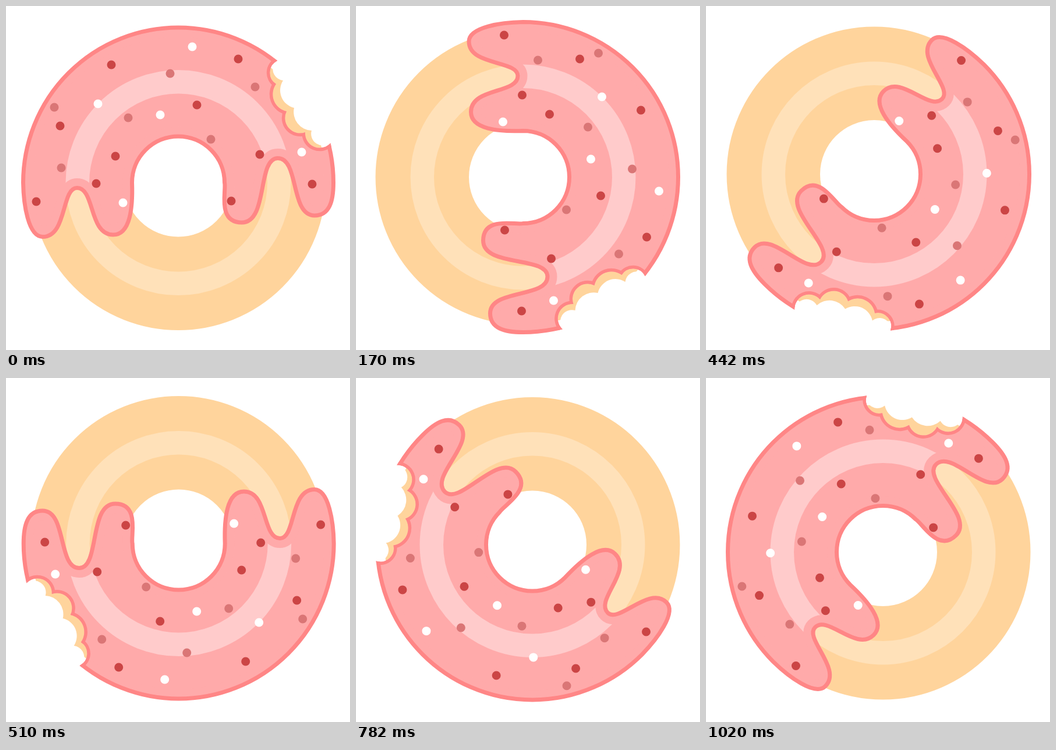
Write an HTML page with a canvas that moves like this. It is 591 by 591 pixels and loops after 1190 ms.

```html
<!DOCTYPE html>
<html lang="en">
<head>
<meta charset="utf-8">
<title>Rolling donut</title>
<style>
  html, body { margin: 0; width: 100%; height: 100%; overflow: hidden; background: #fff; }
  canvas { display: block; }
</style>
</head>
<body>
<canvas id="stage" width="591" height="591"></canvas>
<script>
const SIZE = 591, STEP = 170;
const ctx = document.getElementById('stage').getContext('2d');

const CX = 296, CY = 303.5;   // donut centre in its upright pose
const COLOR = {
  dough: '#ffd49c', doughLight: '#ffe1b9',
  icing: '#ffaaaa', icingLight: '#ffcbcb', rim: '#ff8686'
};

// One pose per step: centre x, centre y, turn in degrees
const poses = [
  [296, 303.5, 0], [287, 294, 90], [289, 289, 135], [296.7, 284.5, 180],
  [303, 286.5, 225], [306.5, 294, 270], [304, 299, 315]
];

const icing = new Path2D(`M29.5,303.5
  C30,340 38,396.5 63,396.5 C105,396.5 95,312.5 122,312.5
  C153,312.5 142,393 184,393 C214,393 218,345 216.5,303.5
  A79.5,79.5 0 0 1 375.5,303.5
  C379,316 362,372 405,372 C451,372 431,261.5 467,261.5
  C504,261.5 488,360 530,360 C556,360 562.5,335 562.5,303.5
  A266.5,266.5 0 0 0 29.5,303.5 Z`);

const icingBite = new Path2D(`M466,94 A23,23 0 0 0 464,134
  A30,30 0 0 0 482,181 A26,26 0 0 0 514,217 A25,25 0 0 0 558,235
  L640,220 L560,20 Z`);

const doughBite = new Path2D(`M460,100 A20,20 0 0 0 476,128
  A31,31 0 0 0 495,175 A32,32 0 0 0 525,214 A20,20 0 0 0 557,235
  L640,220 L560,20 Z`);

const sprinkles = {
  '#ffffff': [[320, 70], [158, 168], [265, 187], [508, 251], [201, 338]],
  '#cb4545': [[181, 101], [399, 91], [328, 170], [93, 206], [188, 258],
              [155, 305], [52, 336], [436, 255], [526, 306], [387, 335]],
  '#da7676': [[282, 116], [428, 139], [83, 174], [210, 192], [352, 229], [95, 278]]
};

function disc(x, y, r) {
  const path = new Path2D();
  path.arc(x, y, r, 0, 2 * Math.PI);
  return path;
}

function ring(inner, outer, color) {
  ctx.lineWidth = outer - inner;
  ctx.strokeStyle = color;
  ctx.stroke(disc(CX, CY, (inner + outer) / 2));
}

function outline(path, width, color) {
  ctx.lineWidth = width;
  ctx.strokeStyle = color;
  ctx.stroke(path);
}

function clipOutside(path) {
  const mask = new Path2D();
  mask.rect(-SIZE, -SIZE, 3 * SIZE, 3 * SIZE);
  mask.addPath(path);
  ctx.clip(mask, 'evenodd');
}

function drawIcing() {
  ctx.save();
  clipOutside(icingBite);
  ctx.fillStyle = COLOR.icing;
  ctx.fill(icing);

  ctx.save();
  ctx.clip(icing);
  ring(153, 193.5, COLOR.icingLight);
  outline(icing, 33, COLOR.icing);   // keeps the shine away from the drips
  ctx.restore();

  outline(icing, 7, COLOR.rim);
  ctx.clip(disc(CX, CY, 270));
  outline(icingBite, 11, COLOR.rim);
  ctx.restore();
}

function drawSprinkles() {
  for (const [color, spots] of Object.entries(sprinkles)) {
    ctx.fillStyle = color;
    for (const [x, y] of spots) ctx.fill(disc(x, y, 7.5));
  }
}

function draw(time) {
  const [x, y, turn] = poses[Math.floor(time / STEP) % poses.length];
  ctx.fillStyle = '#fff';
  ctx.fillRect(0, 0, SIZE, SIZE);
  ctx.save();
  ctx.translate(x, y);
  ctx.rotate(turn * Math.PI / 180);
  ctx.translate(-CX, -CY);
  ring(93, 253.5, COLOR.dough);
  ring(153, 193.5, COLOR.doughLight);
  drawIcing();
  ctx.fillStyle = '#fff';
  ctx.fill(doughBite);
  drawSprinkles();
  ctx.restore();
}

function tick() {
  draw(performance.now());
  requestAnimationFrame(tick);
}
tick();
</script>
</body>
</html>
```
